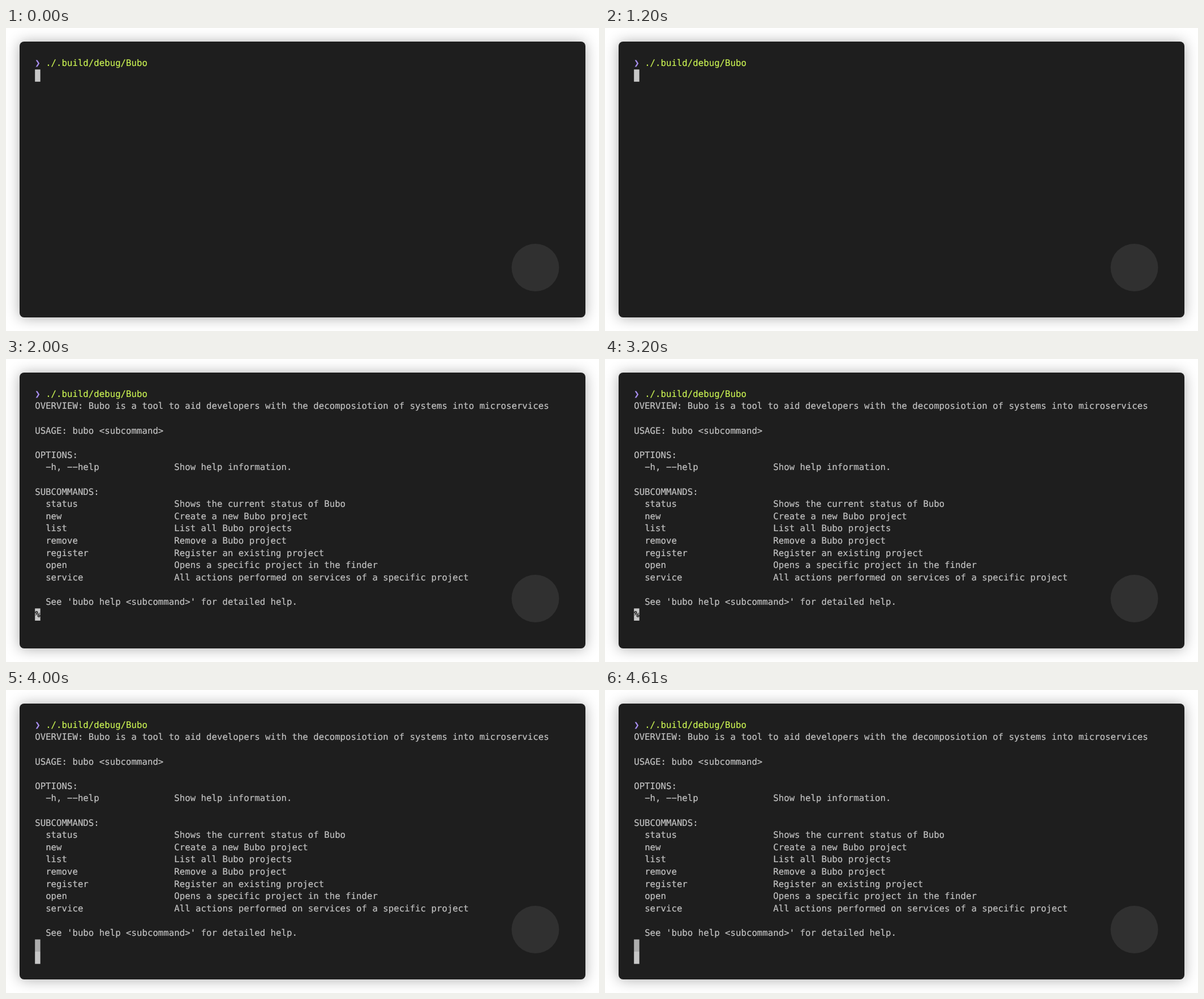
An HTML page that plays this animation: 1048 px wide and 535 px high, repeating every 5010 ms.

```html
<!DOCTYPE html>
<html lang="en">
<head>
<meta charset="utf-8">
<title>Terminal help</title>
<style>
  html, body { margin: 0; width: 100%; height: 100%; overflow: hidden; background: #fff; }
  .window {
    position: absolute; left: 24px; top: 24px; width: 1000px; height: 487px;
    border-radius: 8px; background: #1e1e1e; box-shadow: 0 1px 24px rgba(0, 0, 0, .32);
  }
  svg { position: absolute; left: 0; top: 0; }
  text {
    font: 15.72px "DejaVu Sans Mono", monospace;
    color: #c2c2c2; fill: currentColor; stroke: currentColor; stroke-width: .2px;
    white-space: pre; text-rendering: geometricPrecision;
  }
  .prompt { color: #a98ff0; }
  .command { color: #c8f052; }
  .mark { color: #1e1e1e; font-weight: bold; }
</style>
</head>
<body>
<div class="window"></div>
<svg id="stage" width="1048" height="535" viewBox="0 0 1048 535">
  <circle cx="935.5" cy="423" r="42" fill="#303030"/>
</svg>
<script>
const LOOP = 5010, LEFT = 51.2, TOP = 51.6, COL = 9.464, ROW = 21.6, BASE = 15.2;
const stage = document.getElementById('stage');

function add(parent, tag, attrs, content = '') {
  const node = document.createElementNS('http://www.w3.org/2000/svg', tag);
  for (const key in attrs) node.setAttribute(key, attrs[key]);
  node.textContent = content;
  return parent.appendChild(node);
}

const write = (parent, row, col, str, cls = 'plain') =>
  add(parent, 'text', { x: LEFT + col * COL, y: TOP + row * ROW + BASE, class: cls }, str);

const block = (parent, row, fill) =>
  add(parent, 'rect', { x: LEFT, y: TOP + row * ROW, width: COL, height: ROW, fill });

write(stage, 0, 0, '❯', 'prompt');
write(stage, 0, 2, './.build/debug/Bubo', 'command');

const waiting = add(stage, 'g');
block(waiting, 1, '#c7c7c7');

// Each entry: row, column, text. Long dashes match the terminal's wide hyphen.
const lines = [
  [1, 0, 'OVERVIEW: Bubo is a tool to aid developers with the decomposiotion of systems into microservices'],
  [3, 0, 'USAGE: bubo <subcommand>'],
  [5, 0, 'OPTIONS:'],
  [6, 2, '−h, −−help'],
  [6, 26, 'Show help information.'],
  [8, 0, 'SUBCOMMANDS:'],
  [17, 2, "See 'bubo help <subcommand>' for detailed help."]
];
const commands = [
  ['status', 'Shows the current status of Bubo'],
  ['new', 'Create a new Bubo project'],
  ['list', 'List all Bubo projects'],
  ['remove', 'Remove a Bubo project'],
  ['register', 'Register an existing project'],
  ['open', 'Opens a specific project in the finder'],
  ['service', 'All actions performed on services of a specific project']
];
commands.forEach(([name, about], i) => lines.push([9 + i, 2, name], [9 + i, 26, about]));

const output = add(stage, 'g');
for (const [row, col, str] of lines) write(output, row, col, str);

const marked = add(stage, 'g');
block(marked, 18, '#c7c7c7');
write(marked, 18, 0, '%', 'mark');

const done = add(stage, 'g');
block(done, 18, '#adadad');
block(done, 19, '#c7c7c7');

// Each part with the span of the loop in which it shows.
const spans = [
  [waiting, 0, 2000],
  [output, 2000, LOOP],
  [marked, 2000, 4000],
  [done, 4000, LOOP]
];

const start = performance.now();
function draw() {
  const t = (performance.now() - start) % LOOP;
  for (const [part, from, to] of spans)
    part.style.visibility = t >= from && t < to ? 'visible' : 'hidden';
  requestAnimationFrame(draw);
}
draw();
</script>
</body>
</html>
```
